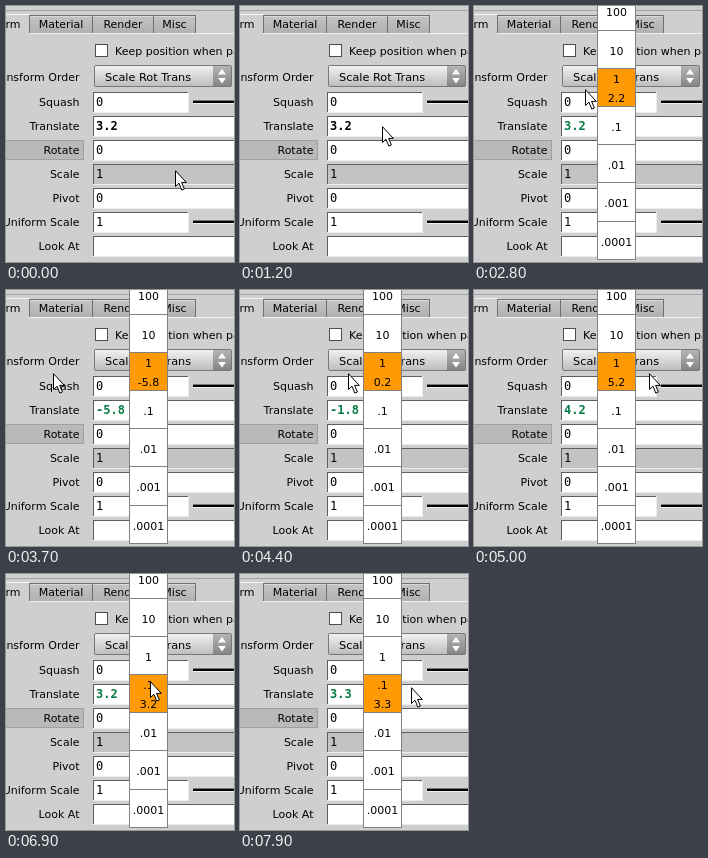
Animation, 228 px wide and 256 px high, one loop 8 s. Source, as an HTML page:

```html
<!DOCTYPE html>
<html lang="en">
<head>
<meta charset="utf-8">
<title>Value ladder</title>
<style>
  html, body { margin: 0; width: 100%; height: 100%; overflow: hidden; background: #cfcfcf; }
  svg { display: block; width: 228px; height: 256px; }
  text { font: 11px "DejaVu Sans", sans-serif; fill: #000; white-space: pre; }
  .mono { font: 12px "DejaVu Sans Mono", monospace; }
  .bold { font-weight: bold; }
  rect, line { shape-rendering: crispEdges; }
</style>
</head>
<body>
<svg id="stage" viewBox="0 0 228 256">
  <defs>
    <linearGradient id="button" x2="0" y2="1">
      <stop offset="0" stop-color="#f2f2f2"/><stop offset="1" stop-color="#bcbcbc"/>
    </linearGradient>
    <linearGradient id="knob" x2="0" y2="1">
      <stop offset="0" stop-color="#b4b4b4"/><stop offset="1" stop-color="#858585"/>
    </linearGradient>
    <linearGradient id="tab" x2="0" y2="1">
      <stop offset="0" stop-color="#c4c4c4"/><stop offset="1" stop-color="#b0b0b0"/>
    </linearGradient>
  </defs>
  <g id="panel"></g>
  <g id="ladder"></g>
  <path id="cursor" d="M.5 .7V16.5L4 13.2L6.8 20.1L9.4 19L6.6 12.4H11.3Z" fill="#fff" stroke="#000"/>
</svg>
<script>
const LOOP = 8000, STEP = 100, MENU_AT = 1600;
const panel = document.getElementById('panel');
const ladder = document.getElementById('ladder');
const cursor = document.getElementById('cursor');

function add(parent, tag, attrs, content = '') {
  const el = document.createElementNS('http://www.w3.org/2000/svg', tag);
  for (const key in attrs) el.setAttribute(key, attrs[key]);
  el.textContent = content;
  parent.append(el);
  return el;
}
const box = (g, x, y, width, height, fill) => add(g, 'rect', { x, y, width, height, fill });
const label = (g, x, y, str, anchor = 'start', cls = '') =>
  add(g, 'text', { x, y, 'text-anchor': anchor, class: cls }, str);

function field(y, width, fill = '#fff') {
  box(panel, 87, y - 10, width, 21, '#ededed');
  box(panel, 87, y - 10, width - 1, 20, '#5e5e5e');
  box(panel, 88, y - 9, width - 2, 19, fill);
}

function slider(y) {
  box(panel, 187, y - 2, 41, 1, '#777');
  box(panel, 187, y - 1, 41, 2, '#000');
  box(panel, 187, y + 1, 41, 1, '#f0f0f0');
}

function drawTabs() {
  box(panel, 0, 0, 228, 256, '#cfcfcf');
  box(panel, 0, 4, 228, 1, '#a2a2a2');
  box(panel, 0, 8, 24, 1, '#f4f4f4');
  box(panel, 23, 27, 205, 1, '#f0f0f0');
  for (const [x, w, name] of [[24, 63, 'Material'], [87, 61, 'Render'], [148, 42, 'Misc']]) {
    box(panel, x - 1, 9, w + 1, 18, '#707070');
    box(panel, x, 10, w - 1, 17, 'url(#tab)');
    box(panel, x, 10, w - 1, 1, '#d8d8d8');
    label(panel, x + w / 2 - .5, 22, name, 'middle');
  }
  label(panel, 14.5, 22, 'Transform', 'end');
}

function drawRows() {
  box(panel, 89, 38, 13, 13, '#4d4d4d');
  box(panel, 90, 39, 11, 11, '#fff');
  label(panel, 109, 49, 'Keep position when parenting');

  label(panel, 73.5, 75, 'Transform Order', 'end');
  add(panel, 'rect', { x: 88.5, y: 59.5, width: 137, height: 21, rx: 2, fill: 'url(#button)', stroke: '#777' });
  box(panel, 207, 60, 18, 20, 'url(#knob)');
  add(panel, 'path', { d: 'M212 68.5L216 63L220 68.5ZM212 72L216 77.5L220 72Z', fill: '#fff' });
  label(panel, 99, 75, 'Scale Rot Trans').style.fontSize = '11.3px';

  box(panel, 0, 134, 78, 20, '#a0a0a0');
  box(panel, 0, 135, 77, 18, '#b9b9b9');

  const rows = [['Squash', '0', 1], ['Translate', ''], ['Rotate', '0'], ['Scale', '1'],
    ['Pivot', '0'], ['Uniform Scale', '1', 1], ['Look At', '']];
  rows.forEach(([name, value, short], i) => {
    const y = 96 + 24 * i;
    label(panel, 73.5, y + 4, name, 'end');
    field(y, short ? 96 : 150, name === 'Scale' ? '#c3c3c3' : '#fff');
    if (short) slider(y);
    label(panel, 90, y + 4, value, 'start', 'mono');
  });
  return label(panel, 90, 124, '3.2', 'start', 'mono bold');
}

function drawLadder() {
  box(ladder, 123, 0, 39, 254, '#808080');
  return ['100', '10', '1', '.1', '.01', '.001', '.0001'].map((name, i) => {
    const top = Math.round(-13.6 + 38.2 * i), next = Math.round(24.6 + 38.2 * i);
    const y = Math.max(0, top);
    return {
      top,
      fill: box(ladder, 124, y, 37, next - y - 1, '#fff'),
      name: label(ladder, 142.5, 0, name, 'middle'),
      value: label(ladder, 142.5, top + 33, '', 'middle'),
    };
  });
}

drawTabs();
const translate = drawRows();
const cells = drawLadder();

// [time, x, y] of the pointer tip
const path = [
  [1000, 169, 164], [1200, 142, 120], [2100, 142, 120], [2200, 140, 108], [2600, 143, 83],
  [2700, 143, 83], [2800, 111, 83], [3600, 48, 83], [3700, 47, 83], [3900, 47, 83],
  [4800, 157, 83], [5000, 175, 83], [5400, 201, 83], [5700, 201, 83], [6100, 155, 81],
  [6300, 144, 82], [6500, 144, 82], [7000, 144, 113], [7400, 144, 113], [7900, 171, 113],
];
// [time, whole steps away from 3.2]
const drag = [
  [2700, 0], [2800, -1], [3500, -9], [3900, -9], [4800, 1], [4900, 1], [5000, 2],
  [5300, 5], [5700, 5], [6000, 1], [6100, 1], [6200, 0],
];

function sample(keys, t, col) {
  const i = keys.findIndex(k => k[0] >= t);
  if (i < 0) return keys[keys.length - 1][col];
  if (i === 0) return keys[0][col];
  const a = keys[i - 1], b = keys[i];
  return a[col] + (b[col] - a[col]) * (t - a[0]) / (b[0] - a[0]);
}

function valueAt(t) {
  const fine = t >= 7700 ? .1 : 0;
  return (3.2 + Math.round(sample(drag, t, 1)) + fine).toFixed(1);
}

function draw(time) {
  const t = Math.floor(time / STEP) * STEP;
  const x = Math.round(sample(path, t, 1)), y = Math.round(sample(path, t, 2));
  const open = t >= MENU_AT;
  cursor.setAttribute('transform', `translate(${x} ${y})`);
  ladder.setAttribute('visibility', open ? 'visible' : 'hidden');
  // the field trails the ladder by one step
  translate.textContent = valueAt(t - STEP);
  translate.style.fill = open ? '#087a43' : '#000';

  const active = y < 101 ? 2 : 3;
  cells.forEach((cell, i) => {
    const on = i === active;
    cell.fill.setAttribute('fill', on ? '#ff9a05' : '#fff');
    cell.name.setAttribute('y', cell.top + (on ? 14 : 23.5));
    cell.value.textContent = on ? valueAt(t) : '';
  });
}

function tick(now) {
  draw(now % LOOP);
  requestAnimationFrame(tick);
}
draw(0);
requestAnimationFrame(tick);
</script>
</body>
</html>
```
